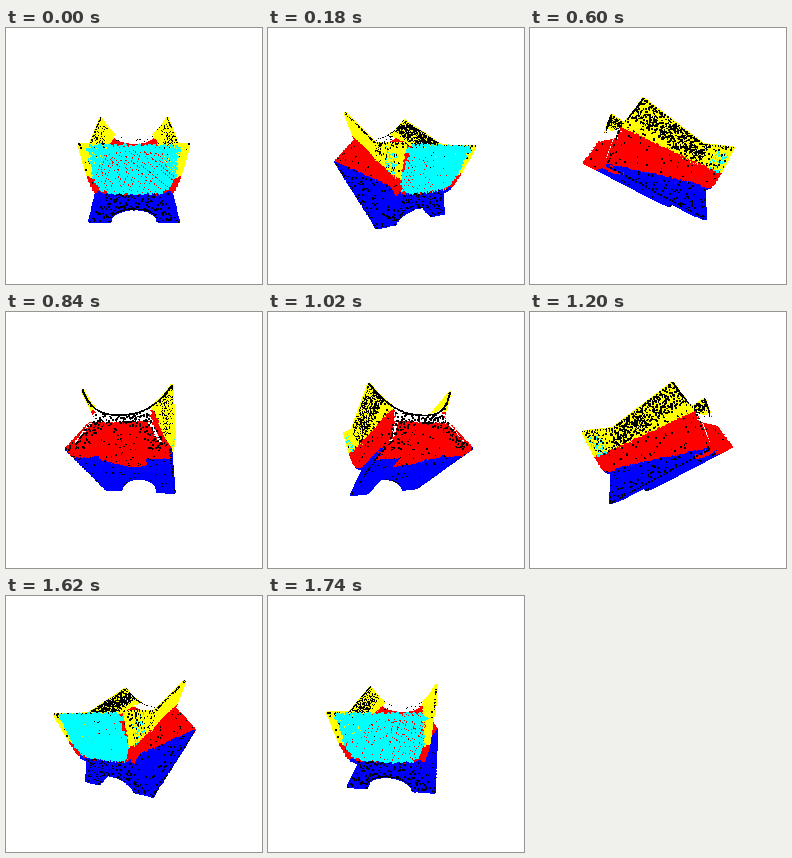
Recreate the animation shown at these times as a matplotlib script. Size 256 px wide and 256 px high, loop 1.8 s.

```python
import numpy as np
import matplotlib.pyplot as plt
from matplotlib.animation import FuncAnimation

SIZE, FRAMES, LOOP = 256, 30, 1800
EYE = 220                  # camera distance, also the focal length
PITCH = np.radians(29)     # forward tilt of the body
LEN, WIDE, BASE = 52, 38.7, 36.5
WAIST_V, WAIST_A = 8, 21
RED, YELLOW, BLUE, CYAN, WHITE, BLACK = range(6)
PALETTE = np.array([(1, 0, 0), (1, 1, 0), (0, 0, 1),
                    (0, 1, 1), (1, 1, 1), (0, 0, 0)])
rng = np.random.default_rng(4)
parts = []


def spread(n):
    """Even points of the unit square."""
    i = np.arange(n) + .5
    p, q = i / n, (i * .6180339887) % 1
    return (p + rng.normal(0, .003, n)).clip(0, 1), (q + rng.normal(0, .004, n)).clip(0, 1)


# The body in its own axes: a across, u along, v down.
def top(u):
    return -21 - 17 * np.clip((u - 17) / 35, 0, 1)


def trough(u, a):
    power = 2.6 + 3.4 * np.clip((u + 10) / 62, 0, 1)
    return 6.5 - (6.5 - top(u)) * np.minimum(np.abs(a) / WIDE, 1) ** power


def side(u, v):
    bulge = 1 - .75 * np.clip((u + 10) / 62, 0, 1)
    up = np.clip((WAIST_V - v) / (WAIST_V - top(u)), 0, 1) ** bulge
    down = np.clip((v - WAIST_V) / (BASE - WAIST_V), 0, 1)
    return WAIST_A + (WIDE - WAIST_A) * (up + down)


def arch(u, a):
    peak = 18.5 + 3.5 * u / LEN
    k = np.minimum(np.abs(a) / 21, 1)
    return peak + (BASE - peak) * (1 - np.sqrt(1 - k ** 2))


def add(a, u, v, color, size=2.3, specks=0, lift=0):
    a, u, v, color = np.broadcast_arrays(a, u, v, color)
    d = u * np.cos(PITCH) - v * np.sin(PITCH)
    y = u * np.sin(PITCH) + v * np.cos(PITCH)
    n = a.size
    parts.append(np.column_stack([a, d, y, color, np.full(n, size), np.full(n, lift)]))
    pick = rng.random(n) < specks
    if pick.any():
        add(a[pick], u[pick], v[pick], BLACK, .7, 0, 2.5)


def flanks():
    p, q = spread(4600)
    u = LEN * (2 * p - 1)
    v = top(u) + (BASE - top(u)) * q
    color = np.where(v < 2 - .12 * (u + LEN), YELLOW,
                     np.where(v > 21 - .29 * u, BLUE, RED))
    patch = (np.abs(u - 41) < 8) & (np.abs(v + 18) < 10) & (rng.random(u.size) < .35)
    color = np.where(patch, CYAN, color)
    rate = np.select([(color == YELLOW) & (v < -6) & (u < 25),
                      color == YELLOW, color == BLUE], [.42, .1, .06], .02)
    for s in (-1, 1):
        add(s * side(u, v), u, v, color, specks=rate)


def channel():
    p, q = spread(6000)
    u = LEN * (2 * p - 1)
    a = WIDE * np.sin((q - .5) * np.pi)
    color = np.where(np.abs(a) > 28 + 5 * u / LEN, YELLOW,
                     np.where(u < -38, WHITE, RED))
    add(a, u, trough(u, a), color, specks=np.where(color == WHITE, .04, .02))


def underside():
    p, q = spread(5600)
    u, a = LEN * (2 * p - 1), WIDE * (2 * q - 1)
    v = arch(u, a)
    add(a, u, v, np.where(v > 25 - .29 * u, BLUE, RED), specks=.03)


def front():
    p, q = spread(2200)
    a, v = WIDE * (2 * p - 1), 5 + 31.5 * q
    keep = (np.abs(a) < side(LEN, v)) & (v < arch(LEN, a)) & (v > trough(LEN, a))
    add(a[keep], LEN, v[keep], BLUE, specks=.1)

    p, q = spread(520)
    a, v = 32 * (2 * p - 1), -38 + 44.5 * q
    keep = v < trough(LEN, a)
    add(a[keep], LEN, v[keep], CYAN, 1.6)

    # level shelf under the front lip
    p, q = spread(420)
    d, y = 40 + 23 * q, -4.7 + 1.2 * np.sin(9 * p)
    add(34 * (2 * p - 1),
        d * np.cos(PITCH) + y * np.sin(PITCH),
        y * np.cos(PITCH) - d * np.sin(PITCH), CYAN, 1.8)


def back():
    p, q = spread(2800)
    a, v = WIDE * (2 * p - 1), 5 + 31.5 * q
    keep = (np.abs(a) < side(-LEN, v)) & (v < arch(-LEN, a)) & (v > trough(-LEN, a))
    a, v = a[keep], v[keep]
    band = v < 14
    add(a[band], -LEN, v[band], WHITE, specks=.2)
    add(a[~band], -LEN, v[~band], RED, specks=.12)
    t = rng.random(30)
    for s in (-1, 1):
        add(s * (23 + 8 * t + rng.random(30)), -LEN - .5, 15 + 16 * t, WHITE, 1.8)


def edges():
    t = np.linspace(-1, 1, 100)
    rim = WIDE * np.sin(t * np.pi / 2)
    add(rim, -LEN - .3, trough(-LEN, rim), BLACK, .7, 0, 1.5)
    t = t[::3]
    add(21 * t, LEN, arch(LEN, 21 * t), BLACK, .7, 0, 1.5)
    for s in (-1, 1):
        add(s * WIDE, LEN * t, top(LEN * t) - .4, BLACK, .7, 0, 1.5)
        add(s * WIDE, LEN * t, BASE + .4, BLACK, .7, 0, 1.5)


for build in (flanks, channel, underside, front, back, edges):
    build()
A, D, Y, hue, size, lift = np.vstack(parts).T
rgb = PALETTE[hue.astype(int)]

fig = plt.figure(figsize=(2.56, 2.56), dpi=100, facecolor="white")
ax = fig.add_axes([0, 0, 1, 1])
ax.set(xlim=(0, SIZE), ylim=(SIZE, 0))
ax.axis("off")
cloud = ax.scatter(A, D, s=size, c=rgb, linewidths=0, antialiased=False)


def draw(i):
    turn = 2 * np.pi * i / FRAMES
    c, s = np.cos(turn), np.sin(turn)
    x, near = A * c + D * s, D * c - A * s
    zoom = EYE / (EYE - near)
    order = np.argsort(lift - np.sqrt(x ** 2 + Y ** 2 + (EYE - near) ** 2))
    spots = np.column_stack([x * zoom, Y * zoom]) + SIZE / 2
    cloud.set_offsets(spots[order])
    cloud.set_facecolors(rgb[order])
    cloud.set_sizes(((size * zoom * .72) ** 2)[order])
    return cloud,


anim = FuncAnimation(fig, draw, frames=FRAMES, interval=LOOP / FRAMES,
                     repeat=True, repeat_delay=0)
plt.show()
```
